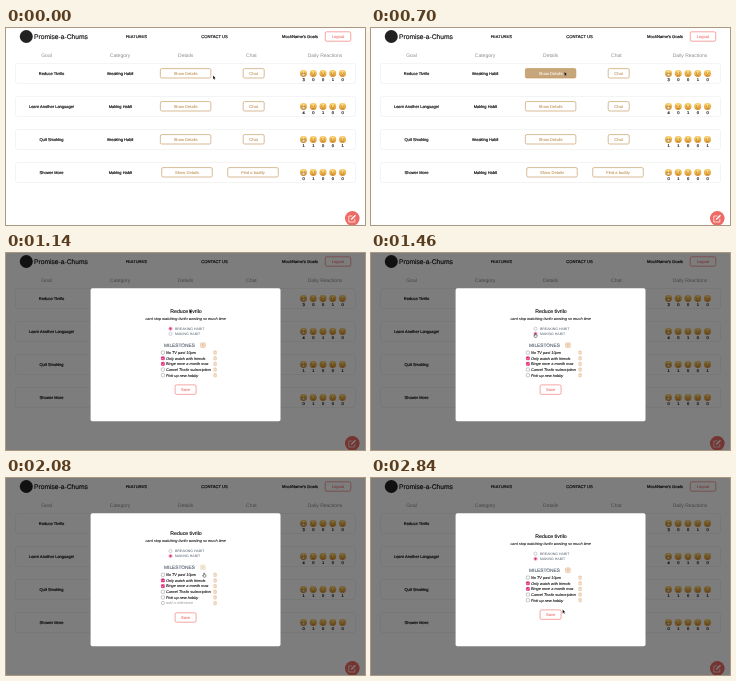
These frames come from a looping animation (359 px wide and 197 px high, 2.98 s). An HTML page:

```html
<!DOCTYPE html>
<html lang="en">
<head>
<meta charset="utf-8">
<title>Habit goals</title>
<style>
  html, body { margin: 0; width: 100%; height: 100%; overflow: hidden; background: #fff; }
  svg { display: block; width: 359px; height: 197px; }
  text { font-family: "Liberation Sans", Arial, sans-serif; text-rendering: geometricPrecision; }
</style>
</head>
<body>
<svg id="stage" viewBox="0 0 359 197">
  <defs>
    <radialGradient id="gold" cy=".25" r=".8">
      <stop offset="0" stop-color="#ffe08a"/><stop offset=".55" stop-color="#f0b548"/><stop offset="1" stop-color="#cf7f28"/>
    </radialGradient>
  </defs>
  <g id="page"></g>
  <g id="dialog">
    <rect width="359" height="197" opacity=".51"/>
    <rect x="84.6" y="35.2" width="189.9" height="133.1" rx="1.8" fill="#fff"/>
    <g id="form"></g>
    <g id="save"></g>
  </g>
  <g id="cursor" stroke-linejoin="round">
    <path id="arrow" d="M0 0V3.9L.9 3.1 1.5 4.4 2.1 4.1 1.5 2.8H2.8Z" stroke="#fff" stroke-width=".2"/>
    <path id="hand" d="M-.4.2Q0-.3.4.2V1.5L1.9 1.9V3.2L1.3 4.2H-.6L-1.5 2.6-1.1 2.2-.4 2.7Z" fill="#fff" stroke="#111" stroke-width=".45"/>
  </g>
</svg>
<script>
const LOOP = 2980;
const $ = id => document.getElementById(id);
const TAN = '#bd8f50', RED = '#ee6a64', PINK = '#d91f6e', SLATE = '#52606f', ORANGE = '#d99a63';

// y is the vertical middle of the capitals
function label(str, x, y, size, { fill = '#111', anchor = 'middle', bold = 0, style = 'normal', id = '' } = {}) {
  return `<text id="${id}" x="${x}" y="${y + size * 0.36}" font-size="${size}" font-style="${style}" text-anchor="${anchor}"
    fill="${fill}" stroke="${fill}" stroke-width="${bold}">${str}</text>`;
}

function box(x, y, w, h, rx, stroke, { fill = 'none', line = 0.5, id = '' } = {}) {
  return `<rect id="${id}" x="${x}" y="${y}" width="${w}" height="${h}" rx="${rx}" fill="${fill}" stroke="${stroke}" stroke-width="${line}"/>`;
}

const button = (str, cx, cy, w, color, id = '') =>
  box(cx - w / 2, cy - 4.7, w, 9.4, 1.4, color, { line: 0.6, id: id && id + 'Box' }) +
  label(str, cx, cy, 4.1, { fill: color, bold: 0.05, id: id && id + 'Text' });

const MOUTHS = [
  'M-2 .3H2Q1.6 2.5 0 2.5T-2 .3Z', 'M-1.5 1.4Q0 2.4 1.5 1.4', 'M-1.4 1.5H1.4',
  'M-1.6 1.1Q0 2.6 1.6 1.1', 'M-1.3 1.9Q0 .9 1.3 1.9'
];

const face = (x, y, i) => `<g transform="translate(${x} ${y}) scale(.94)">
  <circle r="3.7" fill="url(#gold)"/>
  <path d="M-1.9-.6H-.8M.8-.6H1.9" stroke="#7d5220" stroke-width=".7"/>
  <path d="${MOUTHS[i]}" fill="${i ? 'none' : '#fff'}" stroke="#8a5822" stroke-width=".5"/></g>`;

function goalRow([goal, habit, counts], i) {
  const y = 45.3 + i * 33, last = i === 3;
  const bold = { bold: 0.17 };
  let out = box(9.5, y - 9.8, 340, 20, 2, '#e8e8e8') +
    label(goal, 45.5, y, 4, bold) + label(habit + ' Habit', 114.3, y, 4, bold) +
    button('Show Details', last ? 181 : 179.6, y, 50.5, TAN, i ? '' : 'show') +
    (last ? button('Find a buddy', 247, y, 50.5, TAN) : button('Chat', 247.7, y, 21, TAN));
  [...counts].forEach((n, k) => {
    const x = 297.5 + k * 9.75;
    out += face(x, y + 0.3, k) + label(n, x, y + 6.6, 4, bold);
  });
  return out;
}

const nav = { bold: 0.17 };
const head = { fill: '#8c8c8c' };
$('page').innerHTML =
  '<circle cx="20.3" cy="8.5" r="6.5" fill="#222"/>' +
  label('Promise-a-Chums', 28, 8.6, 6.7, { anchor: 'start', bold: 0.15 }) +
  label('FEATURES', 130.3, 8.6, 4.05, nav) + label('CONTACT US', 208.5, 8.6, 4.15, nav) +
  label("MockName's Goals", 294, 8.6, 4.15, nav) + button('Logout', 332, 8.5, 25.5, RED) +
  [['Goal', 40.5], ['Category', 114], ['Details', 179.7], ['Chat', 245.3], ['Daily Reactions', 319]]
    .map(([s, x]) => label(s, x, 26.8, 5, head)).join('') +
  [['Reduce Tivrilo', 'Breaking', '30010'], ['Learn Another Language!', 'Making', '40100'],
   ['Quit Smoking', 'Breaking', '11001'], ['Shower More', 'Making', '01000']].map(goalRow).join('') +
  `<circle cx="346.3" cy="190.3" r="7.3" fill="${RED}"/>
   <g fill="none" stroke="#fff" stroke-width=".7"><path d="M346.5 188H342.8V194H348.8V190.8"/>
   <path d="M345.2 191.6L349.5 187.2" stroke-width="1.4"/></g>`;

const radio = (id, str, y) =>
  `<circle id="${id}Ring" cx="164.5" cy="${y}" r="1.6" fill="#fff" stroke-width=".4"/>
   <circle id="${id}Dot" cx="164.5" cy="${y}" r="1.1" fill="${PINK}"/>` +
  label(str, 169, y + 0.2, 3.5, { anchor: 'start', fill: SLATE });

function milestone(str, i) {
  const y = 99.6 + i * 5.65, checked = i === 1 || i === 2, draft = i === 5;
  return `<g id="item${i}">` +
    box(155.3, y - 1.6, 3.2, 3.2, draft ? 1.5 : 0.6, checked ? PINK : '#777', { fill: checked ? PINK : '#fff', line: 0.4 }) +
    (checked ? `<path d="M156 ${y}l.7.8 1.3-1.6" fill="none" stroke="#fff" stroke-width=".5"/>` : '') +
    label(str, 160, y, 3.85, { anchor: 'start', style: 'italic', fill: draft ? '#999' : '#111', bold: draft ? 0 : 0.1 }) +
    `<path d="M207.5 ${y - 1.2}H210.7M208.5 ${y - 1.7}H209.7M207.9 ${y - 1}V${y + 1.6}H210.3V${y - 1}M209.1 ${y - 0.6}V${y + 1.1}"
      fill="none" stroke="${ORANGE}" stroke-width=".45"/></g>`;
}

$('form').innerHTML =
  label('Reduce tivrilo', 180, 58.2, 5.2, { bold: 0.13 }) +
  label('cant stop watching tivrilo wasting so much time', 179.7, 65.2, 3.88, { style: 'italic', bold: 0.08 }) +
  radio('breaking', 'BREAKING HABIT', 75.7) + radio('making', 'MAKING HABIT', 80.8) +
  label('MILESTONES', 173.5, 92.2, 4.8, { fill: SLATE, bold: 0.1 }) +
  box(194.7, 89.9, 4.5, 4.5, 0.7, ORANGE, { id: 'plus' }) +
  '<path id="plusSign" d="M195.7 92.15H198.2M196.95 90.9V93.4" stroke-width=".5"/>' +
  ['No TV past 10pm', 'Only watch with friends', 'Binge once a month max', 'Cancel Tivrilo subscription',
   'Pick up new hobby', 'add a milestone'].map(milestone).join('');
$('save').innerHTML = button('Save', 179.6, 136.6, 21, RED);

// [time, x, y] of the pointer tip
const PATH = [[0, 207, 47.4], [200, 193.4, 43.8], [940, 193.4, 43.8], [1450, 164.2, 80.2], [1570, 164.2, 80.2],
  [1880, 198, 94.8], [2060, 198, 94.8], [2550, 209.3, 125.3], [2740, 209.3, 125.3], [2840, 191.6, 131.5], [LOOP, 191.6, 131.5]];

const ramp = (t, a, b) => Math.min(1, Math.max(0, (t - a) / (b - a)));
const within = (t, a, b) => t >= a && t < b;
const show = (id, on) => $(id).setAttribute('visibility', on ? 'inherit' : 'hidden');
const set = (id, name, value) => $(id).setAttribute(name, value);

function pointer(t) {
  const i = PATH.findIndex(p => p[0] > t);
  const [t0, x0, y0] = PATH[i - 1], [t1, x1, y1] = PATH[i];
  const u = ramp(t, t0, t1), k = u * u * (3 - 2 * u);
  return [x0 + (x1 - x0) * k, y0 + (y1 - y0) * k];
}

function setRadio(id, on) {
  set(id + 'Ring', 'stroke', on ? PINK : '#888');
  show(id + 'Dot', on);
}

function draw(t) {
  const hover = ramp(t, 40, 190), showInk = hover > 0.5 ? '#fff' : TAN;
  set('showBox', 'fill', '#c8a67c');
  set('showBox', 'fill-opacity', hover);
  set('showText', 'fill', showInk);
  set('showText', 'stroke', showInk);

  show('dialog', t >= 720);
  setRadio('breaking', t < 1440);
  setRadio('making', t >= 1440);

  const adding = within(t, 1880, 2590), pressed = adding && t < 2200;
  show('item5', t >= 720 && adding);
  set('form', 'transform', `translate(0 ${adding ? -2.8 : 0})`);
  set('save', 'transform', `translate(0 ${adding ? 2.9 : 0})`);
  set('plus', 'fill', pressed ? '#f4ead8' : adding ? '#eedfba' : '#fbeadb');
  const plusLine = pressed ? '#e3d3b8' : adding ? '#c2a768' : ORANGE;
  set('plus', 'stroke', plusLine);
  set('plusSign', 'stroke', plusLine);

  const hand = within(t, 1420, 1600) || within(t, 1840, 2100) || within(t, 2500, 2780);
  show('hand', hand);
  show('arrow', !hand);
  set('cursor', 'transform', `translate(${pointer(t)})`);
}

function tick() {
  draw(performance.now() % LOOP);
  requestAnimationFrame(tick);
}
tick();
</script>
</body>
</html>
```
